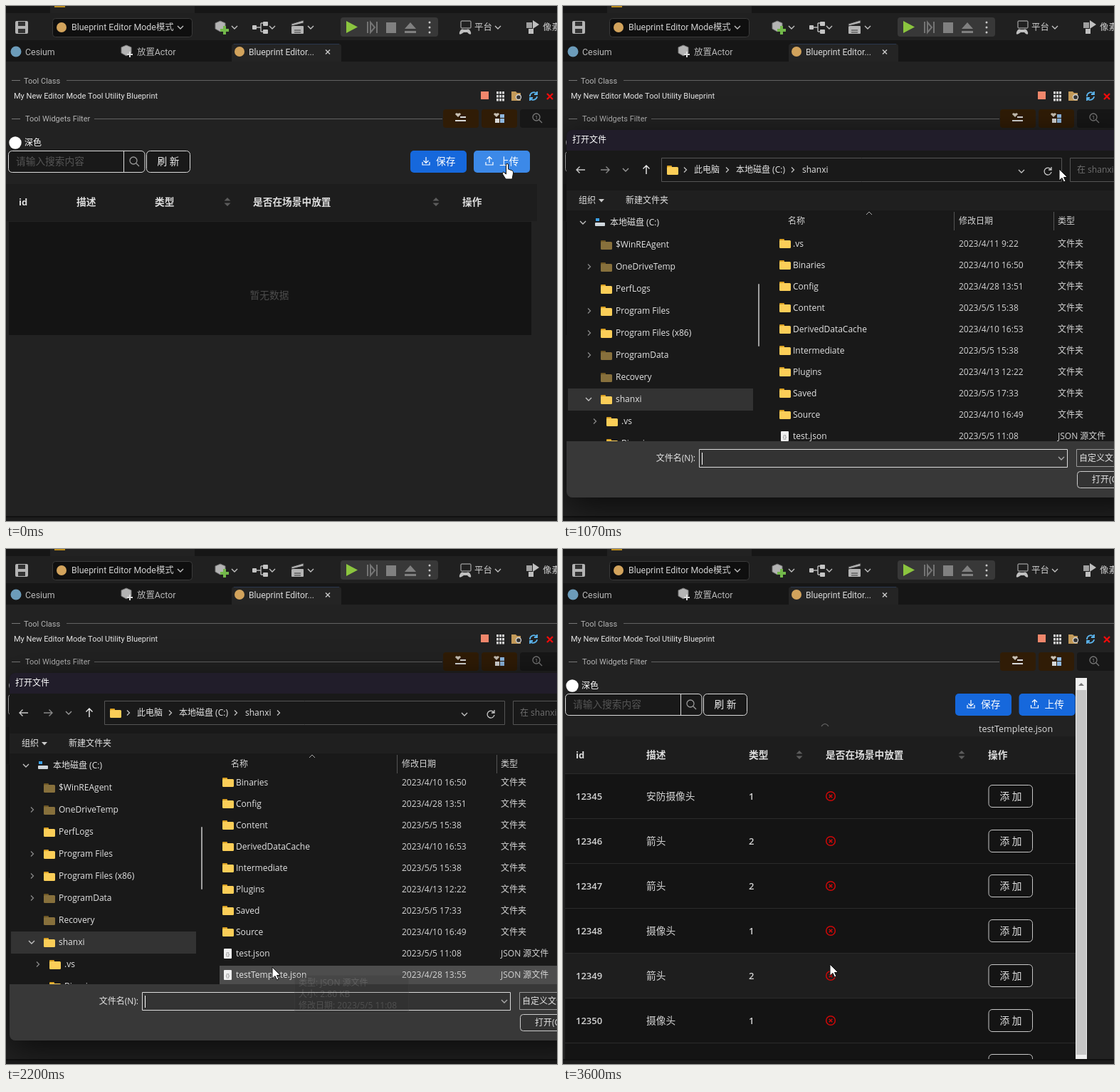
An HTML page with a canvas for the animation above (3670 ms loop, 774 px wide and 723 px high).

```html
<!DOCTYPE html>
<html lang="zh">
<head>
<meta charset="utf-8">
<title>Blueprint Editor Mode</title>
<style>
html, body { margin: 0; width: 100%; height: 100%; overflow: hidden; background: #242424; }
canvas { display: block; }
</style>
</head>
<body>
<canvas id="stage" width="774" height="723"></canvas>
<script>
const W = 774, H = 723, LOOP = 3670, STEPS = 55;
const screen2d = document.getElementById('stage').getContext('2d');
const layer = Object.assign(document.createElement('canvas'), { width: 860, height: H });
const layer2d = layer.getContext('2d');
const CJK = '"Noto Sans CJK SC", "Noto Sans CJK JP", "Noto Sans CJK", sans-serif';
const UI = 'Roboto, ' + CJK, WEB = '"Open Sans", ' + CJK;
let c = screen2d, face = UI;

function text(s, x, y, size, color = '#e4e4e4', weight = 400, align = 'left') {
  c.font = `${weight} ${size}px ${face}`;
  c.textAlign = align;
  c.fillStyle = color;
  c.fillText(s, x, Math.round(y + size * 0.36));
}
function paint(path, fill, stroke, width = 1) {
  if (fill) { c.fillStyle = fill; c.fill(path); }
  if (stroke) { c.strokeStyle = stroke; c.lineWidth = width; c.stroke(path); }
}
function box(x, y, w, h, fill, stroke, r = 0) {
  const p = new Path2D();
  p.roundRect(x, y, w, h, r);
  paint(p, fill, stroke);
}
function shape(d, x, y, fill, stroke, width) {
  c.save();
  c.translate(x, y);
  paint(new Path2D(d), fill, stroke, width);
  c.restore();
}
function disc(x, y, r, fill, stroke, width) {
  const p = new Path2D();
  p.arc(x, y, r, 0, 7);
  paint(p, fill, stroke, width);
}
function clipped(x, y, w, h, draw) {
  c.save();
  c.beginPath();
  c.rect(x, y, w, h);
  c.clip();
  draw();
  c.restore();
}
const down = (x, y, color = '#c0c0c0') => shape('M-4-2L0 2L4-2', x, y, null, color, 1.4);
const right = (x, y, color = '#c0c0c0') => shape('M-2-3.5L1.5 0L-2 3.5', x, y, null, color, 1.3);
const magnifier = (x, y, color) => shape('M4 0A5 5 0 1 1-6 0A5 5 0 1 1 4 0M3 4L7 8', x, y - 1, null, color, 1.3);
const cube = (x, y) => shape('M0-8L7-5V3L0 7L-7 3V-5Z', x, y, '#b4b4b4', '#777');

function folder(x, y, faded) {
  box(x, y - 6, 7, 5, faded ? '#6d5624' : '#d9a022', null, 1);
  box(x, y - 4, 16, 11, faded ? '#87703c' : '#fbce58', null, 1.5);
}
function sorter(x, y) {
  shape('M-4.5-1.5L0-6L4.5-1.5ZM-4.5 1.5L0 6L4.5 1.5Z', x, y, '#5c5c5c');
}

function drawEditor() {
  face = UI;
  box(0, 0, W, H, '#222');
  box(0, 0, W, 10, '#161616');
  box(62, 0, 203, 10, '#222');
  box(68, 0, 15, 2, '#b98a1c');
  box(0, 10, W, 38, '#202020');
  box(0, 48, W, 30, '#161616');

  box(13, 21, 18, 18, '#b4b4b4', null, 2);
  box(17, 22, 10, 6, '#333');
  box(17, 32, 10, 6, '#333');
  box(65.5, 17.5, 196, 26, '#0f0f0f', '#3a3a3a', 4);
  disc(78, 30, 7, '#d2a35c');
  text('Blueprint Editor Mode模式', 92, 30, 12.4, '#cfcfcf');
  cube(301, 29);
  shape('M0-6V6M-6 0H6', 307, 34, null, '#73b84a', 4);
  shape('M0 0H8M8-6V6M8-6H13M8 6H13', 350, 30, null, '#b4b4b4', 1.5);
  box(346, 27, 6, 6, '#c4c4c4', null, 1);
  box(361, 22, 7, 6, '#c4c4c4', null, 1);
  box(361, 33, 7, 6, '#c4c4c4', null, 1);
  box(401, 28, 17, 11, '#b4b4b4', null, 1);
  shape('M0 5L17 0V4L0 8ZM4 14H13M4 17H13', 401, 20, '#b4b4b4', '#333', 1);
  for (const x of [245, 321, 374, 428, 691]) down(x, 30);

  box(470, 16, 137, 27, '#383838', null, 4);
  shape('M0 0L16 8.5L0 17Z', 478, 21, '#8bc53f');
  shape('M0 0V16M4 1L10 8L4 15ZM13 0V16', 508, 22, null, '#747474', 2);
  box(534, 23, 14, 15, '#808080');
  shape('M8 0L16 9H0ZM0 12H16V15H0Z', 560, 23, '#808080');
  for (const y of [23, 30, 37]) disc(595, y, 1.5, '#c8c8c8');
  box(639, 21, 14, 10, null, '#c0c0c0', 1);
  shape('M0 5Q2-1 6 1H10Q14-1 16 5Q17 9 13 7L11 5H6L3 7Q-1 9 0 5Z', 637, 32, '#c0c0c0');
  text('平台', 658, 30, 12.4, '#cfcfcf');
  box(731, 23, 8, 8, '#a0a0a0');
  box(734, 32, 7, 7, '#c0c0c0');
  shape('M0 0L9 6L0 12Z', 740, 20, '#c0c0c0');
  text('像素流送', 754, 30, 12.4, '#cfcfcf');

  disc(14, 64, 7.5, '#6c9cba');
  text('Cesium', 27, 64.5, 12.4, '#b8b8b8');
  cube(169, 63);
  shape('M0-4V4M-4 0H4', 174, 68, null, '#ddd', 2);
  text('放置Actor', 184, 64.5, 12.4, '#b8b8b8');
  box(317, 53, 154, 25, '#242424', null, [4, 4, 0, 0]);
  box(320, 53, 148, 1, '#29364d');
  disc(328, 64, 7, '#d2a35c');
  text('Blueprint Editor...', 341, 64.5, 12.2, '#d8d8d8');
  shape('M-3-3L3 3M3-3L-3 3', 452, 64.5, null, '#ccc', 1.4);

  box(8, 104, 12, 1, '#777');
  text('Tool Class', 25, 105, 11, '#b4b4b4');
  box(85, 104, 689, 1, '#626262');
  text('My New Editor Mode Tool Utility Blueprint', 11, 126.5, 11);
  box(667, 120, 11, 11, '#f0876c');
  for (let i = 0; i < 9; i++) box(689 + i % 3 * 4, 120 + (i / 3 | 0) * 5, 3, 3.5, '#d8d8d8');
  shape('M0 0H6L8 2H13V13H0Z', 710, 120, '#c39a59');
  disc(720, 128, 3.5, '#333', '#d8d8d8', 1.3);
  shape('M-5 1A5.5 5.5 0 0 1 4-3.5M5-6V-2H1M5 1A5.5 5.5 0 0 1-4 4.5M-5 7V3H-1', 741, 126, null, '#5cb5ee', 1.8);
  shape('M-4-4L4 4M4-4L-4 4', 764, 127, null, '#f00b0b', 2.4);

  box(8, 158, 12, 1, '#777');
  text('Tool Widgets Filter', 27, 158.5, 11, '#b4b4b4');
  box(124, 158, 489, 1, '#626262');
  box(614, 145, 50, 26, '#301c06', null, 4);
  box(668, 145, 50, 26, '#301c06', null, 4);
  box(722, 145, 56, 26, '#171717', null, 4);
  const heart = 'M0 2L-4-2Q-3-5 0-3Q3-5 4-2Z';
  shape(heart, 635, 154, '#c8c0b4');
  box(638, 155, 8, 2, '#d8d8d8');
  box(631, 160, 15, 2, '#d8d8d8');
  shape(heart, 689, 154, '#c8c0b4');
  box(694, 152, 6, 5, '#8fb8e0');
  box(687, 158, 6, 6, '#d8d8d8');
  box(694, 158, 6, 6, '#8fb8e0');
  magnifier(746, 157, '#777');
  text('1', 745, 156, 8, '#888', 400, 'center');
}

function button(x, label, color, arrow) {
  box(x, 203, 79, 31, color, null, 5);
  shape('M-5 1V5H5V1M0 2V-6' + arrow, x + 22, 218, null, '#fff', 1.2);
  text(label, x + 36, 218, 13.7, '#fff', 500);
}

function header(y, columns, sorters) {
  ['id', '描述', '类型', '是否在场景中放置', '操作'].forEach((s, i) =>
    text(s, columns[i], y, i ? 13.7 : 13, '#dedede', 700));
  sorters.forEach(x => sorter(x, y));
}

function drawTable() {
  box(3, 263, 717, 453, '#141414');
  box(3, 263, 717, 52, '#1d1d1d');
  header(289, [18, 117, 261, 369, 597], [332, 560]);
  shape('M-5 3Q0-4 5 3', 368, 246, null, '#666', 1.2);
  text('testTemplete.json', 584, 252, 12.6, '#dcdcdc');
  ['安防摄像头', '箭头', '箭头', '摄像头', '箭头', '摄像头', '箭头'].forEach((name, i) => {
    const y = 347 + 63 * i;
    if (i === 4) box(3, y - 31, 717, 62, '#1e1e1e');
    box(3, y - 32, 717, 1, '#2b2b2b');
    text(12345 + i, 18, y, 13, '#d4d4d4', 600);
    text(name, 117, y, 13.7, '#d4d4d4', 500);
    text(name === '箭头' ? 2 : 1, 261, y, 13, '#d4d4d4', 600);
    disc(376, y, 6.3, null, '#d00808', 1.5);
    shape('M-2.3-2.3L2.3 2.3M2.3-2.3L-2.3 2.3', 376, y, null, '#d00808', 1.5);
    box(598, y - 15.5, 61.5, 31, '#141414', '#c8c8c8', 5);
    text('添 加', 629, y, 13.7, '#e4e4e4', 500, 'center');
  });
  box(720, 181, 16, 535, '#f0f0f0');
  box(721, 198, 14, 512, '#c6c6c6');
  shape('M-4 2L0-2L4 2Z', 728, 190, '#777');
}

function drawPage(f) {
  const loaded = f >= 44;
  face = WEB;
  disc(13, 192, 8.7, '#fff');
  text('深色', 26, 192, 12, '#fff', 500);
  box(3.5, 203.5, 191.5, 30, '#191919', '#dcdcdc', 5);
  box(165, 204, 1, 29, '#dcdcdc');
  text('请输入搜索内容', 14, 218, 13.7, '#555');
  magnifier(180, 218, '#999');
  box(197.5, 203.5, 61, 30, '#191919', '#dcdcdc', 5);
  text('刷 新', 228, 218, 13.7, '#f0f0f0', 500, 'center');
  const upload = f > 8 ? '#1668dc' : f === 6 || f === 7 ? '#1554ad' : '#3c89e8';
  button(loaded ? 551 : 568, '保存', '#1668dc', 'M-3.5-1L0 2.5L3.5-1');
  button(loaded ? 640.5 : 657, '上传', upload, 'M-3.5-3L0-6.5L3.5-3');
  if (loaded) clipped(0, 181, W, 535, drawTable);
  else {
    box(0, 250, 746, 52, '#1d1d1d');
    header(275, [18, 99, 209, 347, 641], [311, 604]);
    box(4, 303, 734, 159, '#141414');
    text('暂无数据', 370, 406, 13.7, '#4c4c4c', 400, 'center');
  }
  box(0, 716, W, 2, '#111');
  box(0, 718, W, 5, '#1c1c1c');
}

const TREE = ['$WinREAgent', 'OneDriveTemp', 'PerfLogs', 'Program Files', 'Program Files (x86)', 'ProgramData', 'Recovery', 'shanxi'];
const FILES = [
  ['.vs', '4/11 9:22'], ['Binaries', '4/10 16:50'], ['Config', '4/28 13:51'], ['Content', '5/5 15:38'],
  ['DerivedDataCache', '4/10 16:53'], ['Intermediate', '5/5 15:38'], ['Plugins', '4/13 12:22'], ['Saved', '5/5 17:33'],
  ['Source', '4/10 16:49'], ['test.json', '5/5 11:08'], ['testTemplete.json', '4/28 13:55']
];

function drawTree() {
  down(28, 304);
  box(46, 298, 5, 4, '#3aa0e8');
  box(45, 304, 14, 5, '#cfd6dc', null, 1);
  text('本地磁盘 (C:)', 66, 304, 12);
  box(7, 537, 260, 31, '#333');
  TREE.forEach((name, i) => {
    const y = 335 + 31 * i;
    folder(53, y, [0, 1, 5, 6].includes(i));
    text(name, 74, y, 12);
    if ([1, 3, 4, 5].includes(i)) right(37, y, '#888');
  });
  down(36, 552);
  right(45, 583, '#888');
  ['.vs', 'Binaries'].forEach((name, i) => {
    folder(61, 583 + 31 * i);
    text(name, 82, 583 + 31 * i, 12);
  });
  box(274, 390, 2, 88, '#a0a0a0', null, 1);
}

function drawFiles(f, [mx, my], chosen) {
  const scroll = f >= 25 ? 36 : 0;
  const hovered = mx > 300 && my > 316 ? Math.floor((my - 319 + scroll) / 30) : -1;
  FILES.forEach(([name, date], i) => {
    const y = 334 + 30 * i - scroll, json = name.endsWith('.json');
    if (i === hovered) box(300, y - 13, 520, 26, chosen ? '#777' : '#4d4d4d');
    if (json) {
      box(306, y - 7, 11, 14, '#f0f0f0', null, 1);
      text('{}', 311.5, y, 7, '#666', 400, 'center');
    } else folder(304, y - 1);
    text(name, 323, y, 12);
    text('2023/' + date, 556, y, 12, '#d4d4d4');
    text(json ? 'JSON 源文件' : '文件夹', 695, y, 12, '#d4d4d4');
  });
}

function drawTooltip(alpha) {
  c.globalAlpha = alpha;
  box(405.5, 598.5, 160, 53, '#2b2b2b', '#555', 3);
  ['类型: JSON 源文件', '大小: 2.80 KB', '修改日期: 2023/5/5 11:08'].forEach((s, i) =>
    text(s, 411, 609 + 16 * i, 12, '#ddd'));
  c.globalAlpha = 1;
}

function drawDialog(f, mouse) {
  const chosen = f >= 36;
  face = WEB;
  c.clearRect(0, 0, layer.width, H);
  c.save();
  c.beginPath();
  c.roundRect(5, 174, 810, 516, 8);
  c.clip();
  box(5, 174, 810, 516, '#191919');
  box(5, 174, 810, 29, '#211d2a');
  text('打开文件', 13, 187.5, 12, '#fff');
  box(5, 611, 810, 79, '#383838');
  if (f < 16) {
    box(5, 203, 810, 408, '#fff');
    box(266, 288, 17, 323, '#171717');
    box(274, 390, 2, 87, '#a0a0a0');
    box(130, 625, 56, 17, '#fff');
    box(191, 621, 518, 26, '#fff');
    box(721, 621, 94, 25, '#fff');
    box(721, 652, 94, 25, '#fff');
    c.restore();
    return;
  }
  shape('M6 0H-6M-1.5-4.5L-6 0L-1.5 4.5', 25, 230, null, '#c8c8c8', 1.4);
  shape('M-6 0H6M1.5-4.5L6 0L1.5 4.5', 59, 230, null, '#888', 1.4);
  down(88, 230, '#999');
  shape('M0 6V-6M-4.5-1.5L0-6L4.5-1.5', 117, 230, null, '#eee', 1.4);
  box(138.5, 213.5, 562, 33, null, '#555');
  folder(146, 230);
  text('此电脑', 184, 230, 12);
  text('本地磁盘 (C:)', 243, 230, 12);
  text('shanxi', 336, 230, 12);
  for (const x of f > 16 ? [172, 231, 323, 383] : [172, 231, 323]) right(x, 230);
  down(644, 232);
  shape('M4-3A5 5 0 1 0 5 1M5-6V-2H1', 681, 232, null, '#ccc', 1.3);
  box(712.5, 213.5, 120, 33, null, '#555');
  text('在 shanxi 中搜索', 722, 230, 12, '#707070');
  box(5, 259, 810, 28, '#1f1f1f');
  text('组织', 22, 273, 12);
  shape('M-4-2H4L0 2.5Z', 54, 273, '#ccc');
  text('新建文件夹', 88, 273, 12);

  text('名称', 316, 302, 12, '#d4d4d4');
  text('修改日期', 556, 302, 12, '#d4d4d4');
  text('类型', 695, 302, 12, '#d4d4d4');
  box(549, 289, 1, 26, '#555');
  box(689, 289, 1, 26, '#555');
  shape('M-4 2L0-2L4 2', 430, 291, null, '#aaa');
  clipped(5, 287, 285, 324, drawTree);
  clipped(290, 316, 525, 295, () => drawFiles(f, mouse, chosen));

  text('文件名(N):', 186, 635, 12, '#e4e4e4', 400, 'right');
  box(191.5, 622.5, 517, 25, '#333', '#dcdcdc');
  if (chosen) text('testTemplete.json', 195, 635, 12);
  else if (f < 24 || f >= 32) box(195, 627, 1, 17, '#fff');
  down(700, 635, '#aaa');
  box(721.5, 622.5, 120, 24, '#333', '#999');
  text('自定义文件', 725, 635, 12);
  box(722.5, 653.5, 120, 23, '#333', '#ccc', 4);
  text('打开(O)', 743, 665, 12);
  if (f >= 28 && f <= 33) drawTooltip(f === 33 ? 0.18 : 1);
  c.restore();
}

// Step, x, y of the pointer tip.
const PATH = [
  [0, 704, 222], [10, 704, 222], [13, 702, 222], [16, 697, 229], [18, 640, 330], [21, 498, 517], [25, 420, 578],
  [28, 390, 572], [32, 386, 574], [33, 374, 587], [36, 370, 592], [40, 369, 597], [48, 370, 588], [54, 375, 583]
];
function pointer(f) {
  const i = Math.max(1, PATH.findIndex(p => p[0] >= f));
  const [a, b] = [PATH[i - 1], PATH[i]];
  const k = (f - a[0]) / (b[0] - a[0]);
  return [a[1] + (b[1] - a[1]) * k, a[2] + (b[2] - a[2]) * k];
}

// Scale and opacity of the file dialog while it opens and closes.
const POSES = { 11: [0.91, 0.25], 12: [0.93, 0.65], 13: [0.957, 1], 14: [0.98, 1], 15: [0.995, 1], 39: [0.985, 0.8], 40: [0.967, 0.43], 41: [0.95, 0.15] };

function render(f) {
  const mouse = pointer(f);
  c = screen2d;
  drawEditor();
  drawPage(f);
  if (f >= 11 && f <= 41) {
    c = layer2d;
    drawDialog(f, mouse);
    c = screen2d;
    const [scale, alpha] = POSES[f] || [1, 1];
    c.save();
    c.globalAlpha = alpha;
    c.shadowColor = `rgba(0,0,0,${0.7 * alpha ** 2})`;
    c.shadowBlur = 50;
    c.shadowOffsetY = 12;
    c.translate(407 * (1 - scale), 408 * (1 - scale));
    c.scale(scale, scale);
    c.drawImage(layer, 0, 0);
    c.restore();
  }
  const hand = f < 11 || (f >= 40 && f < 44);
  shape(hand
    ? 'M-1.5 0Q0-1 1.5 0V7L7 9Q9 10 8.5 13L7 21H-2L-6.5 14Q-7 11-5 11L-1.5 14Z'
    : 'M0 0V16L4 12.5L6.5 18L9 17L6.5 11.5H11.5Z', ...mouse, '#fff', '#111', 1);
}

const start = performance.now();
let shown = -1;
function tick() {
  const t = (performance.now() - start) % LOOP;
  const f = Math.min(STEPS - 1, Math.floor((t + 5) * STEPS / LOOP));
  if (f !== shown) render(shown = f);
  requestAnimationFrame(tick);
}
tick();
</script>
</body>
</html>
```
